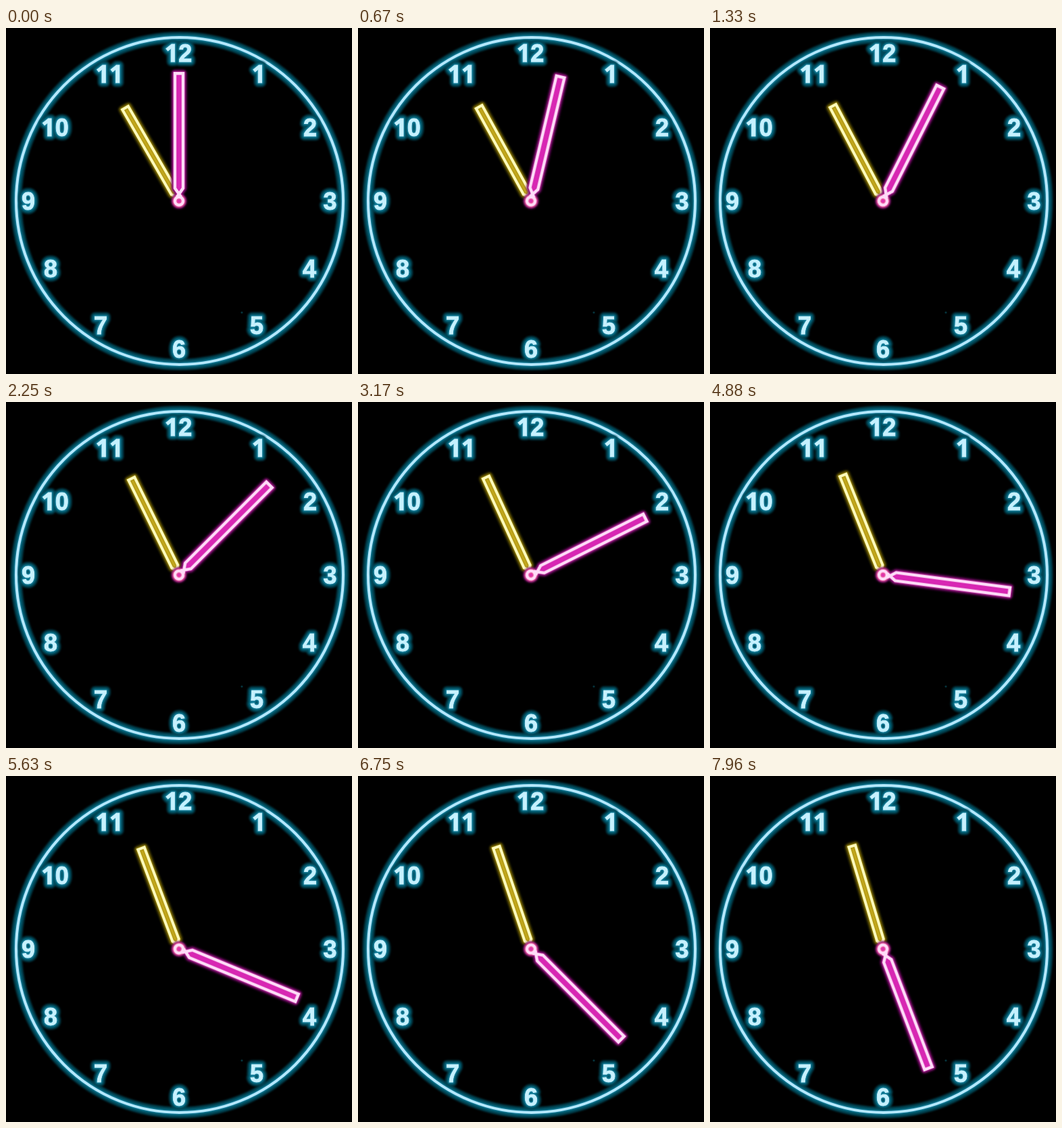
An HTML page for the animation above (8000 ms loop, 512 px wide and 512 px high).

```html
<!DOCTYPE html>
<html lang="en">
<head>
<meta charset="utf-8">
<title>Neon clock</title>
<style>
  html, body { margin: 0; width: 100%; height: 100%; overflow: hidden; background: #000; }
  svg { display: block; width: 100%; height: 100%; }
  text { font: bold 36px "Liberation Sans", Arial, sans-serif; text-anchor: middle; }
  .one { font-family: "Open Sans", "Noto Sans", sans-serif; }
  .line { fill: none; stroke-linejoin: miter; }
</style>
</head>
<body>
<svg viewBox="0 0 512 512">
  <defs>
    <filter id="wide" filterUnits="userSpaceOnUse" x="-256" y="-256" width="1024" height="1024">
      <feGaussianBlur stdDeviation="1.8"/>
    </filter>
    <filter id="tight" filterUnits="userSpaceOnUse" x="-256" y="-256" width="1024" height="1024">
      <feGaussianBlur stdDeviation="1.1"/>
    </filter>
    <filter id="soft" filterUnits="userSpaceOnUse" x="-256" y="-256" width="1024" height="1024">
      <feGaussianBlur stdDeviation="0.45"/>
    </filter>
    <circle id="face" cx="257" cy="256" r="242"/>
    <path id="hourShape" d="M-5 -14V-159H5V-14L2 -10H-2Z"/>
    <path id="minuteShape" d="M-3 -6L6 -19V-188.8H-6V-19L3 -6"/>
    <circle id="hub" r="6"/>
  </defs>
  <rect width="512" height="512"/>
  <circle cx="349" cy="421" r="1.6" fill="#06343c"/>
  <g id="dial"></g>
  <g id="hour"></g>
  <g id="minute"></g>
</svg>
<script>
const STEP = 1000 / 24, LOOP = 8000;
const $ = id => document.getElementById(id);

const numerals = [
  [12, 255, 38], [1, 374, 69], [2, 450, 147.5], [3, 479.5, 257],
  [4, 449, 356.5], [5, 371, 441], [6, 256, 476], [7, 140, 440.5],
  [8, 66, 356.5], [9, 33, 257], [10, 72.5, 147.5], [11, 153, 69]
];
const digits = n => String(n).replace(/1/g, '<tspan class="one">1</tspan>');
const labels = numerals
  .map(([n, x, y]) => `<text x="${x}" y="${y + 12.2}">${digits(n)}</text>`).join('');

const layer = (body, color, width, filter = '', extra = '') =>
  `<g class="line" stroke="${color}" stroke-width="${width}"` +
  `${filter && ` filter="url(#${filter})"`} ${extra}>${body}</g>`;
const use = id => `<use href="#${id}"/>`;

const round = 'style="stroke-linejoin:round"';
$('dial').innerHTML =
  layer(use('face'), '#054a5a', 16, 'wide') +
  layer(use('face'), '#12809c', 7, 'tight') +
  layer(use('face'), '#b4e8ff', 4, 'soft') +
  layer(labels, '#054a5a', 12, 'wide', round) +
  layer(labels, '#12809c', 4.5, 'tight', round) +
  layer(labels, '#c6f1ff', 0.9, 'soft', 'style="fill:#c6f1ff"');

$('hour').innerHTML =
  layer(use('hourShape'), '#574b00', 11, 'wide', round) +
  layer(use('hourShape'), '#a08c08', 5.5, 'tight', 'style="fill:#c4a81c"') +
  layer(use('hourShape'), '#fffbbc', 4, 'soft');

const pink = use('minuteShape') + use('hub');
$('minute').innerHTML =
  '<circle r="10" fill="#f0609c" opacity=".65" filter="url(#wide)"/>' +
  layer(pink, '#6c0860', 11, 'wide', round) +
  layer(pink, '#cf1fa8', 5.5, 'tight', 'style="fill:#d828b4"') +
  layer(use('hub'), '#f0609c', 7, 'tight') +
  layer(pink, '#ffdcf8', 4.4, 'soft');

const turn = (id, angle) =>
  $(id).setAttribute('transform', `translate(256 256) rotate(${angle})`);

// 24 steps per second; the minute hand sweeps 20 degrees per second.
function draw(t) {
  const angle = Math.floor((t + 4.9) / STEP) * STEP * 0.02;
  turn('minute', angle);
  turn('hour', angle / 12 - 30);
}

const start = performance.now();
function tick() {
  draw((performance.now() - start) % LOOP);
  requestAnimationFrame(tick);
}
draw(0);
requestAnimationFrame(tick);
</script>
</body>
</html>
```
